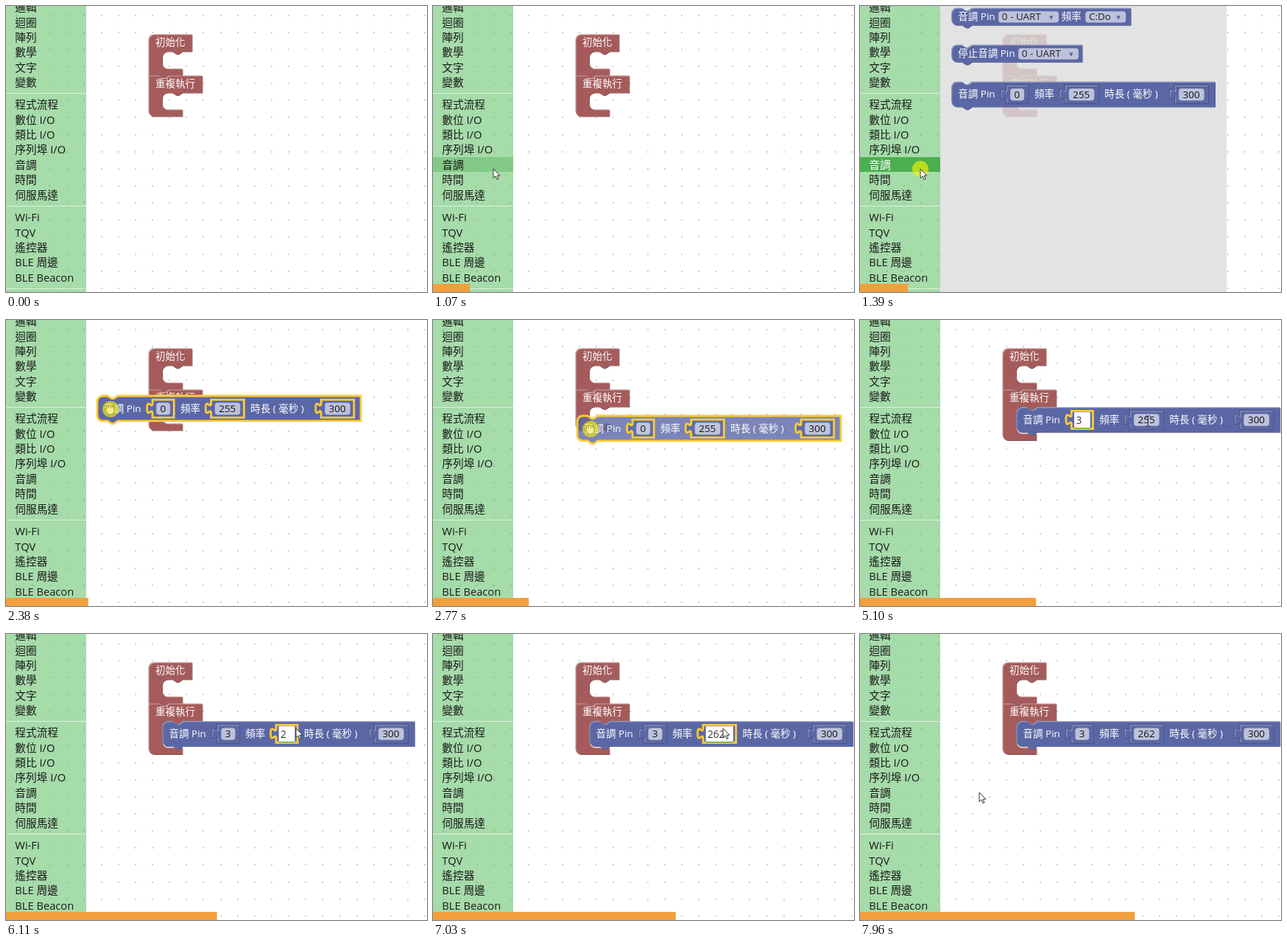
Recreate the animation shown at these times as an HTML page with a canvas. Size 572 by 388 pixels, loop 8 s.

```html
<!DOCTYPE html>
<html lang="zh-Hant">
<head>
<meta charset="utf-8">
<style>
  html, body { margin: 0; width: 100%; height: 100%; overflow: hidden; background: #fff; }
  canvas { display: block; }
</style>
</head>
<body>
<canvas id="stage" width="572" height="388"></canvas>
<script>
const ctx = document.getElementById('stage').getContext('2d');
const LOOP = 8000, SCALE = 0.93;
const FONT = '"Open Sans", "Noto Sans CJK TC", "Noto Sans CJK", sans-serif';
const RED = { fill: '#a55b5b', light: '#c79a9a', dark: '#7d4444' };
const BLUE = { fill: '#5b67a5', light: '#8c95c0', dark: '#495284' };
const YELLOW = '#fc3';

const MENU = [
  [2, ['邏輯', '迴圈', '陣列', '數學', '文字', '變數']],
  [134, ['程式流程', '數位 I/O', '類比 I/O', '序列埠 I/O', '音調', '時間', '伺服馬達']],
  [287, ['Wi-Fi', 'TQV', '遙控器', 'BLE 周邊', 'BLE Beacon']]
];

// Moments of the interaction, in ms
const HOVER = 720, OPEN = 1270, GRAB = 2310, DRAG = 2400, DROP = 3010;
const EDIT_PIN = 3600, TYPE_3 = 4600, EDIT_FREQ = 5290;
const TYPE_2 = 6030, TYPE_26 = 6680, TYPE_262 = 7000, DONE = 7560;
const PRESSES = [[1240, 1470], [2220, DROP], [3560, 3720], [5250, 5420], [7510, 7720]];

// Pointer path: time, x, y
const POINTER = [
  [0, 371, 400], [70, 371, 385], [800, 82, 221], [1480, 82, 221], [2050, 142, 121],
  [DRAG, 142, 121], [2540, 193, 131], [2770, 214, 148], [2960, 230, 138], [3050, 230, 138],
  [3480, 301, 137], [4600, 301, 137], [5080, 391, 137], [5240, 398, 136], [5500, 398, 136],
  [5800, 394, 128], [7050, 394, 128], [7450, 369, 197], [7720, 369, 197], [7960, 162, 215],
  [LOOP, 162, 215]
];

const between = (t, a, b) => t >= a && t < b;

function pointerAt(t) {
  const i = POINTER.findIndex(k => k[0] > t);
  const [t0, x0, y0] = POINTER[i - 1], [t1, x1, y1] = POINTER[i];
  const u = (t - t0) / (t1 - t0), e = u * u * (3 - 2 * u);
  return [x0 + (x1 - x0) * e, y0 + (y1 - y0) * e];
}

function rect(x, y, w, h, color, r = 0) {
  ctx.fillStyle = color;
  ctx.beginPath();
  ctx.roundRect(x, y, w, h, r);
  ctx.fill();
}

function text(str, x, y, size, color, weight = 400) {
  ctx.font = `${weight} ${size}px ${FONT}`;
  ctx.fillStyle = color;
  ctx.fillText(str, x, y);
}

function at(x, y, draw) {
  ctx.save();
  ctx.translate(x, y);
  ctx.scale(SCALE, SCALE);
  draw();
  ctx.restore();
}

function bevel(path, { fill, light, dark }) {
  const layer = (color, d) => {
    ctx.save();
    ctx.translate(d, d);
    ctx.fillStyle = color;
    ctx.fill(path);
    ctx.restore();
  };
  layer(dark, 1);
  layer(light, 0);
  ctx.save();
  ctx.clip(path);
  layer(fill, 1.4);
  ctx.restore();
}

// Selected shapes are flat with a yellow outline; only their fill fades
function outlined(path, { fill }, alpha) {
  ctx.globalAlpha = alpha;
  ctx.fillStyle = fill;
  ctx.fill(path);
  ctx.globalAlpha = 1;
  ctx.strokeStyle = YELLOW;
  ctx.lineWidth = 3;
  ctx.stroke(path);
}

const label = (str, x, y) => text(str, x, y, 14.5, '#fff');

const NOTCH = 'l6 4 3 0 6 -4', NOTCH_BACK = 'l-6 4 -3 0 -6 -4';

// C-shaped container; joined corners are square
function container(name, y, width, inner, first) {
  const start = first ? 'M0 8A8 8 0 0 1 8 0' : `M0 0H15${NOTCH}`;
  const end = first ? `H30${NOTCH_BACK}H0z` : 'H8a8 8 0 0 1 -8 -8z';
  const path = new Path2D(`${start}H${width}v25H49.5${NOTCH_BACK}h-6.5a8 8 0 0 0 -8 8` +
    `v${inner - 16}a8 8 0 0 0 8 8H49.5v10${end}`);
  at(193.4, y, () => {
    bevel(path, RED);
    label(name, 10.3, 17);
  });
}

function command(width, height, selected, alpha) {
  const path = new Path2D(
    `M0 8A8 8 0 0 1 8 0H15${NOTCH}H${width}V${height}H30${NOTCH_BACK}H8a8 8 0 0 1 -8 -8z`);
  selected ? outlined(path, BLUE, alpha) : bevel(path, BLUE);
}

function dropdown(str, x, w) {
  rect(x, 5, w, 16.5, '#bdc2db', 4);
  text(str, x + 5, 18, 14.5, '#222');
  text('▾', x + w - 14, 17.5, 12, BLUE.fill);
}

const valueWidth = str => 23 + 8.35 * str.length;

function value(str, x, { selected, editing, highlighted, alpha }) {
  const w = valueWidth(str);
  const path = new Path2D(`M${x} 5.5h${w}v26h${-w}v-6c0 -10 -8 8 -8 -7.5s8 2.5 8 -7.5z`);
  if (selected || editing) {
    outlined(path, BLUE, alpha);
  } else {
    ctx.strokeStyle = BLUE.dark;
    ctx.lineWidth = 2.5;
    ctx.stroke(path);
    bevel(path, BLUE);
  }
  if (editing) {
    rect(x + 4, 7.5, w - 8, 23, '#fff');
    rect(x + 4, 30, w - 8, 1.5, '#4caf50');
    if (highlighted) rect(x + 6, 9.5, 8.4 * str.length + 1, 19, '#3297fd');
    text(str, x + 6.5, 24.5, 14.8, highlighted ? '#fff' : '#333');
  } else {
    rect(x + 5.5, 10, w - 11, 17.5, 'rgba(255,255,255,.6)', 4);
    text(str, x + 11.3, 23.8, 14.5, '#111');
  }
}

function toneBlock(x, y, { pin = '0', freq = '255', selected = false, edit = '', highlighted = false, alpha = 1 } = {}) {
  const shift = valueWidth(freq) - valueWidth('255');
  const look = name => ({ selected, alpha, highlighted, editing: edit === name });
  at(x, y, () => {
    command(385 + shift, 36.5, selected, alpha);
    label('音調 Pin', 10, 23.5);
    value(pin, 80.7, look('pin'));
    label('頻率', 121.5, 23.5);
    value(freq, 166.3, look('freq'));
    label('時長 ( 毫秒 )', 224 + shift, 23.5);
    value('300', 327 + shift, look('duration'));
  });
}

function grid() {
  for (let x = 13.75; x < 572; x += 23.15)
    for (let y = 12.5; y < 388; y += 23.15) rect(Math.round(x) - 1, Math.round(y) - 1, 2, 2, '#d0d0d0');
}

function flyout() {
  rect(109, 0, 389, 388, 'rgba(221,221,221,.82)');
  at(124, 2.5, () => {
    command(262, 25);
    label('音調 Pin', 10, 17.5);
    dropdown('0 - UART', 69, 88);
    label('頻率', 161, 17.5);
    dropdown('C:Do', 196, 59);
  });
  at(124, 52.5, () => {
    command(191, 25);
    label('停止音調 Pin', 10, 17.5);
    dropdown('0 - UART', 98, 88);
  });
  toneBlock(124, 102.6);
}

function sidebar(t) {
  rect(0, 0, 109, 388, 'rgba(79,183,86,.5)');
  const open = between(t, OPEN, GRAB);
  if (open) rect(0, 205, 109, 20, '#4caf50');
  else if (between(t, HOVER, OPEN)) rect(0, 205, 109, 20, 'rgba(76,175,80,.4)');
  for (const [top, rows] of MENU)
    rows.forEach((row, i) => {
      const color = open && row === '音調' ? '#fff' : '#1a1a1a';
      text(row, 12.3, top + i * 20.4 + 5.2, 14.7, color, /[A-Z]/.test(row) ? 400 : 300);
    });
  for (const y of [118, 271, 383]) rect(0, y, 109, 1, 'rgba(255,255,255,.6)');
}

function workspaceTone(t, [px, py]) {
  if (t < GRAB) return;
  if (t < DROP) {
    toneBlock(px - 18, py - 18, { selected: true, alpha: t < DRAG ? 1 : 0.8 });
    return;
  }
  const edit = between(t, EDIT_PIN, EDIT_FREQ) ? 'pin' : between(t, EDIT_FREQ, DONE) ? 'freq' : '';
  toneBlock(212.3, 118.2, {
    edit,
    selected: t < EDIT_PIN,
    pin: t < TYPE_3 ? '0' : '3',
    freq: t < TYPE_2 ? '255' : t < TYPE_26 ? '2' : t < TYPE_262 ? '26' : '262',
    highlighted: edit === 'pin' ? t < TYPE_3 : t < TYPE_2
  });
}

const ARROW = new Path2D('M0 0V12.5L3 9.8L5 14.5L7 13.6L5 9.1H9z');
const BEAM = new Path2D('M-3 -7H-1L0 -6L1 -7H3M0 -6V6M-3 7H-1L0 6L1 7H3');
const HAND = new Path2D('M-5 -1V-4Q-3.5 -6 -2.5 -4Q-1 -7 .5 -4.5Q2 -6.5 3 -4Q5 -5 5 -2V3L3 7H-3L-6 2Q-7 0 -5 -1z' +
  'M-2.5 -4V-1M.5 -4.5V-1M3 -4V-1');

function pointer(t, [x, y]) {
  if (t < 70) return;
  ctx.save();
  ctx.translate(x, y);
  const pressed = PRESSES.some(([a, b]) => between(t, a, b));
  if (pressed) {
    ctx.fillStyle = 'rgba(255,250,0,.6)';
    ctx.beginPath();
    ctx.arc(0, 0, 11, 0, 7);
    ctx.fill();
  }
  ctx.lineWidth = 1;
  ctx.strokeStyle = '#333';
  if (between(t, 3430, 4680) || between(t, 5020, 5650)) {
    ctx.stroke(BEAM);
  } else {
    const hand = between(t, 2000, 3080), shape = hand ? HAND : ARROW;
    ctx.fillStyle = hand && pressed ? '#f6f08a' : '#fff';
    if (hand) ctx.strokeStyle = '#a39c3c';
    ctx.fill(shape);
    ctx.stroke(shape);
  }
  ctx.restore();
}

function draw(t) {
  const pos = pointerAt(t);
  rect(0, 0, 572, 388, '#fff');
  grid();
  container('初始化', 38.3, 63.5, 25, true);
  container('重複執行', 94.2, 78.5, t < DROP ? 24.5 : 39, false);
  workspaceTone(t, pos);
  if (between(t, OPEN, GRAB)) flyout();
  sidebar(t);
  pointer(t, pos);
  rect(0, 377, t * 0.0469, 11, '#f2a03d');
}

function frame(now) {
  draw(now % LOOP);
  requestAnimationFrame(frame);
}
requestAnimationFrame(frame);
</script>
</body>
</html>
```
